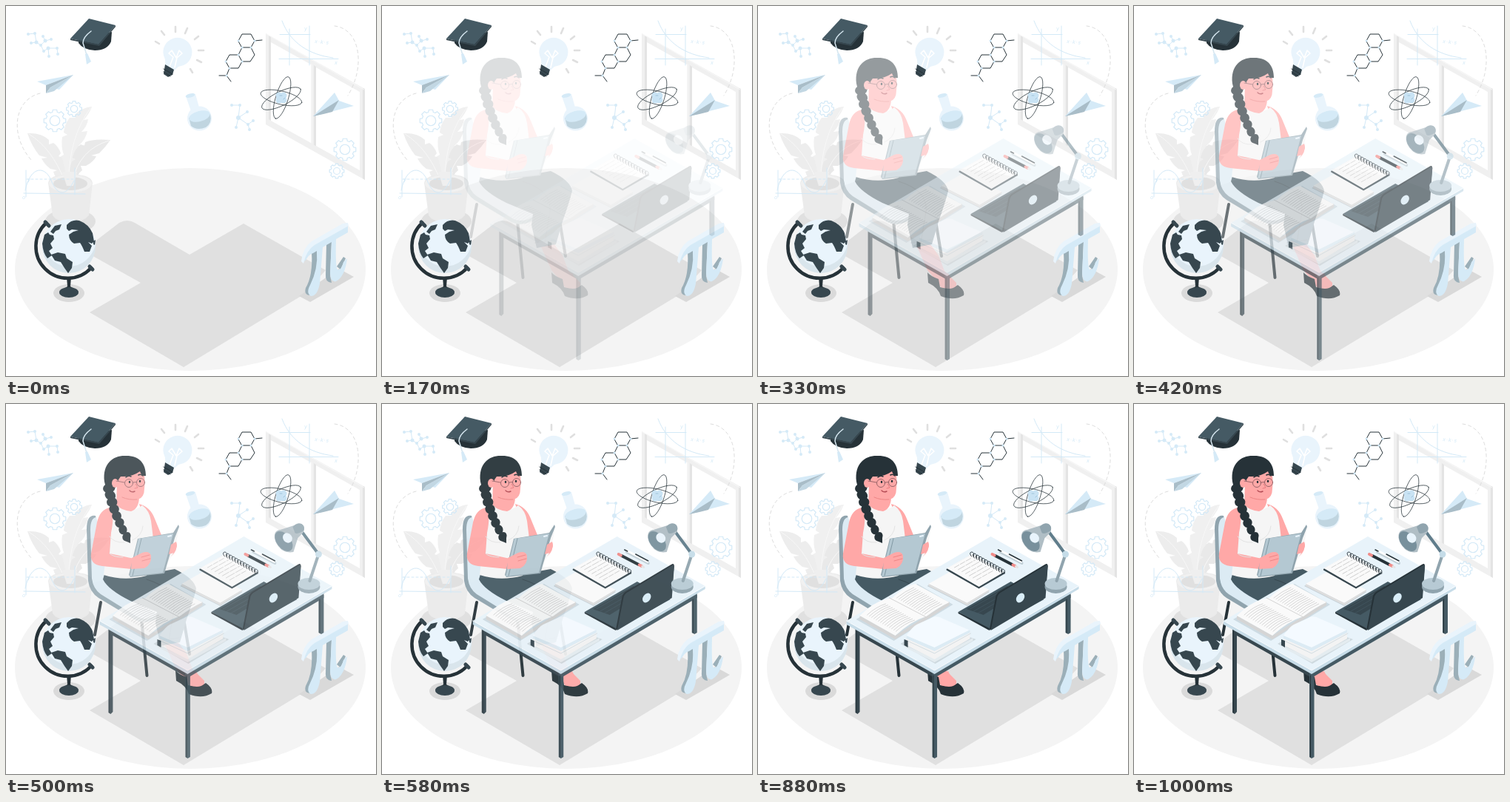
An HTML page for the animation above (1040 ms loop, 500 px wide and 500 px high).

```html
<!DOCTYPE html>
<html lang="en">
<head>
<meta charset="utf-8">
<title>Student at a desk</title>
<style>
html, body { margin: 0; width: 100%; height: 100%; overflow: hidden; background: #fff; }
svg { display: block; width: 100%; height: 100%; }
.line { fill: none; stroke-linecap: round; stroke-linejoin: round; }
.blue { stroke: #d3e9f7; }
.ink { stroke: #263238; }
.sky { fill: #d5eaf7; }
.pale { fill: #e9f4fc; }
.dark { fill: #263238; }
.slate { fill: #37474f; }
.steel { fill: #455a64; }
.mist { fill: #e0e0e0; }
.skin { fill: #ffa8a7; }
text { font: italic 7px Inter, sans-serif; fill: #d3e9f7; }
</style>
</head>
<body>
<svg viewBox="0 0 500 500">
  <!-- floor -->
  <ellipse cx="249" cy="356" rx="237" ry="137" fill="#f4f4f4"/>
  <g class="mist">
    <path d="M113 414 182 374 114 336Q106 330 114 323L153 293Q164 287 174 293L248 336 321 294 432 357 402 390 240 488Z"/>
    <path d="M396 392 411 400 470 366 450 355Z" fill="#d9d9d9"/>
    <ellipse cx="87" cy="291" rx="34" ry="17"/>
    <ellipse cx="85" cy="388" rx="21" ry="12" fill="#dadada"/>
  </g>

  <!-- window -->
  <path fill="#f0f0f0" fill-rule="evenodd" d="M351 37 485 112V235L351 160ZM358 49V155L412 185V79ZM419 83V189L478 222V116Z"/>
  <path fill="#e4e4e4" d="M355 40 358 41V155L355 153ZM416 80 419 82V189L416 188ZM482 111 485 112V235L482 233Z"/>
  <path class="line" stroke="#f8f8f8" d="M352 38 484 113M413 79V185"/>

  <!-- plant -->
  <g fill="#f0f0f0">
    <path d="M116 136Q103 137 93 147L94 151 86 151Q79 160 78 171L83 174 76 177Q74 190 78 201L71 205Q73 222 83 238H92Q93 216 102 206L94 207Q105 198 107 188L98 189Q108 180 110 169L102 170Q110 162 111 153L105 154Q113 145 116 136Z"/>
    <path fill="#ededed" d="M29 172Q48 171 58 181L58 187 64 185Q71 190 74 199L71 203 76 205Q80 222 83 237L74 237Q66 232 64 224L69 222 60 220Q52 214 48 206L56 205 45 202Q34 188 29 172Z"/>
    <path fill="#e9e9e9" d="M141 181Q118 179 107 184L106 189 101 187Q92 194 90 205L94 207 89 210Q84 224 85 238H94Q97 226 103 222L101 216 108 216Q118 211 122 203L115 202 126 199Q135 190 141 181Z"/>
    <path class="line" stroke="#f8f8f8" d="M114 138Q85 178 85 236M31 173Q62 192 79 236M139 182Q99 194 90 236"/>
  </g>
  <path fill="#ebebeb" d="M57 239Q58 228 87 227 116 228 117 239L112 283Q105 292 87 292 69 292 63 283Z"/>
  <ellipse cx="87" cy="240" rx="29" ry="12" fill="#f1f1f1"/>
  <ellipse cx="87" cy="240" rx="23" ry="9" fill="#e0e0e0"/>
  <path fill="#efefef" d="M76 224H96L91 243H82Z"/>

  <!-- globe -->
  <path class="dark" d="M82 366H88L87 379 98 386H72L83 379Z"/>
  <ellipse cx="85" cy="387" rx="13" ry="7" class="slate"/>
  <circle cx="85" cy="325" r="36" fill="#d9e5ec"/>
  <path class="pale" d="M49 325A36 36 0 0 1 121 323Q112 351 85 352 62 352 49 325Z"/>
  <g class="slate">
    <path d="M82 296Q89 288 99 290 112 295 117 307L119 318 116 321 111 319 116 324 113 332 106 332Q103 324 100 320L92 321Q85 317 85 309L91 305 98 303 89 302 85 304 82 301Z"/>
    <path d="M118 318 121 316 120 323 118 322Z"/>
    <path d="M66 297 75 295 72 302 67 304 64 308 60 305Z"/>
    <path d="M52 309 57 306 59 309 64 310 65 315 60 321 63 327 58 331 62 337 56 341Q50 334 49 321Z"/>
    <path d="M61 336 70 333 80 335 82 341 90 346 89 354 84 361 79 354 74 346 66 344Z"/>
  </g>
  <path class="line ink" stroke-width="4.500" stroke-linecap="butt" d="M54.500 293A43 43 0 1 0 115 354"/>
  <path class="line" stroke="#37474f" stroke-width="5" d="M53 292 58 297M113 352 117 356"/>

  <!-- graduation cap -->
  <path class="dark" d="M98 45 143 35 142 48Q137 60 120 60 104 59 98 50Z"/>
  <path class="steel" d="M87 44 112 17 148 26 125 52Z"/>
  <path class="slate" d="M87 44 125 52 148 26V28L126 54 87 46Z"/>
  <path class="line" stroke="#d5e6ef" stroke-width="1.500" d="M115 34Q104 42 104 50L109 66"/>
  <path class="sky" d="M107 65 110 64 115 75 109 79Z"/>

  <!-- bulb -->
  <path class="line" stroke="#dfdfdf" stroke-width="2.600" d="M202 48 207 51M210 34 214 39M229 28V35M245 30 242 37M260 41 255 45M267 60H260M264 76 258 73M252 90 249 85"/>
  <path class="pale" d="M215 79Q216 73 213 67A19.500 19.500 0 1 1 240 80L233 82 226 88Z"/>
  <path class="line" stroke="#fff" stroke-width="1.600" d="M221 82 226 69 220 64 224 60 230 70 234 60 238 64 231 70 228 83"/>
  <path class="slate" d="M215 79 227 86 225 93 219 96 213 92Z"/>
  <path class="line ink" d="M213 85 225 92M213 89 222 95"/>

  <!-- flask -->
  <circle cx="261.500" cy="152" r="16.500" class="pale"/>
  <path class="pale" d="M243 122 256 119 261 137 250 142Z"/>
  <path fill="#c0d5e0" d="M247 151Q262 156 276 146 279 158 270 164 258 169 250 162Z"/>
  <ellipse cx="261.500" cy="149" rx="14.500" ry="7" transform="rotate(-15 261.500 149)" class="sky"/>
  <ellipse cx="249" cy="121" rx="6.500" ry="2.600" transform="rotate(-14 249 121)" class="sky"/>

  <!-- paper planes -->
  <path class="line" stroke="#dcdcdc" stroke-dasharray="4 4" d="M46 118C10 127 5 175 34 208M444 27C479 31 486 82 462 121"/>
  <path class="sky" d="M42 102 91 93 54 107ZM91 93 72 113 60 110ZM415 149 444 117 450 128ZM415 149 450 128 470 135Z"/>
  <path fill="#a9bdc8" d="M54 107 91 93 60 110 54 118ZM415 149 450 127 441 143 429 146Z"/>
  <path fill="#c2d7e3" d="M54 118 60 110 91 93 65 115Z"/>

  <!-- graphs -->
  <g class="line blue">
    <path d="M24 253 107 254M27 222V258M93 219V255M26 249C33 215 54 215 62 238 71 258 82 256 92 236"/>
    <path stroke-dasharray="3 3" d="M28 234H92"/>
    <path d="M369 71.500H449M410 27V80M383 31V80M370 38.500H411M373 20C384 50 410 66 442 70"/>
  </g>
  <text x="22" y="261">o</text><text x="29" y="237">y</text>
  <text x="403" y="33">y</text><text x="444" y="79">x</text>
  <text x="417" y="50" transform="rotate(6 417 50)" letter-spacing="1">x·k·s</text>

  <!-- hexagon chain -->
  <g class="line ink">
    <path d="M314 47 319 38H331L336 47 331 56H319ZM319 56 314 66 319 75H330L336 66 331 56M314 66H302L297 75 302 84H314L319 75M336 47 346 46M302 84 298 94H288M298 94 304 102"/>
    <path stroke="#cfe6f5" stroke-width="3" d="M314 47h.1M319 56h.1M331 56h.1M336 47h.1M314 66h.1M319 75h.1M297 75h.1M302 84h.1M298 94h.1"/>
  </g>

  <!-- atom -->
  <g class="line ink" stroke-width=".7">
    <ellipse cx="372" cy="124" rx="28.500" ry="9" transform="rotate(13 372 124)"/>
    <ellipse cx="372" cy="125" rx="29" ry="9.500" transform="rotate(-26 372 125)"/>
    <ellipse cx="373" cy="124" rx="29.500" ry="8.500" transform="rotate(107 373 124)"/>
  </g>
  <g fill="#c9e3f4">
    <circle cx="369" cy="121" r="4.500"/><circle cx="375" cy="121" r="4.500"/><circle cx="369" cy="127" r="4.500"/><circle cx="375" cy="127" r="4.500"/>
  </g>
  <path class="line" stroke="#9fc3da" d="M370 121H373M375 126 377 124"/>

  <g id="extras"></g>

  <!-- pi -->
  <path fill="#9bafb8" d="M413 333 420 329 421 344Q420 366 412 391 402 391 405 381 415 364 413 333ZM433 321 440 317 438 365 440 374Q431 373 432 363ZM447 352 456 339 459 341 452 356Z"/>
  <path class="sky" d="M401 347 406 342Q410 335 415 334L420 331Q422 355 411 377 405 388 412 392 421 392 424 375L428 326 440 319 438 360Q438 374 446 372 458 366 461 341L456 346Q453 358 448 356 445 354 446 315L462 306V293L415 321Q404 329 401 347Z"/>
  <path class="pale" d="M399 345Q401 327 413 318L455 294 462 293 463 297 417 323Q406 330 402 348Z"/>

  <g id="person">
    <!-- chair -->
    <path class="line ink" stroke-width="4" d="M128 268 120 312M183 290 190.500 367M237 272 248 338"/>
    <path fill="#90a4ae" d="M121 151Q109 149 109 169L111 239Q113 254 125 262L175 292Q186 298 200 292L255 259 250 243 180 240 130 190Z"/>
    <path fill="#dcebf4" d="M122 153Q114 154 114 170L116 236Q118 250 128 257L178 288Q187 292 198 288L255 254 190 225 135 200Z"/>
    <!-- lower body -->
    <path class="skin" d="M213 321 230 318 244 337 252 358 268 374 268 383 250 384 240 370 229 357Z"/>
    <path class="dark" d="M229 360Q233 365 244 369L246 380Q262 383 270 377 280 384 278 391 265 399 247 392 244 381 230 374Z"/>
    <path class="skin" d="M246 365 257 361Q261 371 268 378 262 385 247 380Z"/>
    <path class="steel" d="M133 230Q160 222 190 230L228 223Q255 236 257 250 252 269 244 291L235 322 209 327 202 296 204 281 168 266Q138 251 131 237Z"/>
    <path class="line" stroke="#37474f" d="M190 237Q230 249 227 278L220 320M207 320 234 316"/>
    <!-- torso -->
    <path class="skin" d="M180 135Q195 139 201 155L210 177Q231 178 231 192 229 204 219 208L204 190 190 168Z"/>
    <path fill="#f5f5f5" d="M146 137Q169 149 184 137 194 144 196 158L199 182 190 232Q160 240 132 231L136 195 133 149Z"/>
    <path class="skin" d="M150 106 181 112 180 127Q179 142 169 145 156 144 149 136Z"/>
    <path class="skin" d="M141 140Q127 142 123 160L115 202Q113 217 130 219L179 224Q194 220 196 206 194 199 184 203L173 209 140 202 142 174Q147 151 141 140Z"/>
    <path class="line" stroke="#e3e3e3" d="M140 179Q146 188 160 187M185 165Q184 178 171 184M140 202Q145 207 158 207"/>
    <!-- head -->
    <path class="skin" d="M148 88 184 87Q189 99 187 114 187 127 178 129 164 130 154 118Z"/>
    <path class="dark" d="M133 105C130 80 145 70 160 70 179 69 189 79 189 97Q183 98 181 91 170 99 155 98 152 101 151 106L146 117 135 113Z"/>
    <g id="braid" class="dark"></g>
    <ellipse cx="147.500" cy="107" rx="4.500" ry="6" class="skin"/>
    <g class="line ink" stroke-width=".9">
      <circle cx="166" cy="107" r="5.500" stroke="#8d5d63"/><circle cx="182" cy="106" r="5.500" stroke="#8d5d63"/>
      <path stroke="#8d5d63" d="M171.500 106 176.500 105.500M160 106 149 104"/>
      <path stroke-width="1.600" d="M162 99Q165 96 169 98M179 96Q182 94 185 97"/>
      <path stroke-width="2.400" d="M167 105v.8M181 104v.8"/>
      <path stroke="#e5777b" d="M175 108 178 113 174 114"/>
      <path stroke="#b44c55" stroke-width="1.400" d="M167 117Q170 120 174 118"/>
    </g>
    <path class="line" stroke="#ed8585" d="M157 126Q166 130 177 129"/>
    <!-- held book -->
    <path fill="#f7f7f7" d="M211 228 223 178 233 164V172L228 198Z"/>
    <path fill="#8fa3ad" d="M178 182 226 174 233 163 234 166 228 181 214 229 168 234 166 231Z"/>
    <path fill="#b4c8d2" d="M179 182 226 175 212 228 167 233Z"/>
    <path class="line" stroke="#8299a4" d="M183 182 171 232"/>
    <path class="line" stroke="#e9f4fc" stroke-width="2" d="M219 179 223 178"/>
    <path class="skin" d="M170 208 184 201Q194 198 196 205 197 217 187 222L169 223ZM223 190 230 186Q232 194 227 201L220 203Z"/>
    <path class="line" stroke="#ed8585" d="M183 207 194 204M184 212 195 209"/>
  </g>

  <g id="desk">
    <path class="steel" d="M417 258H424V309L420.500 311 417 309Z"/>
    <path class="slate" d="M133 301 240 361V370L139 313V416L136 419 133 417Z"/>
    <path class="steel" d="M240 361 424 255V262L243.500 368V477L240 479 237 477V361Z"/>
    <path class="line ink" d="M134.500 305V417M238.500 367V477M418.500 264V309"/>
    <path fill="#c7dce8" d="M121 293 240 360 435 246V250L240 365 121 298Z"/>
    <path fill="#e8f3fa" d="M121 293 316 179 435 246 240 360Z"/>
    <path class="line" stroke="#f8fcff" d="M121 293 240 360 435 246"/>

    <!-- open book -->
    <path fill="#cddbe3" d="M134 291 217 243 265 271 185 320Z"/>
    <path fill="#d5d5d5" d="M139 286 187 313 260 267V272L187 318 139 291Z"/>
    <path fill="#fafafa" d="M139 286Q157 268 174 264L183 262Q200 246 214 243L260 268Q245 275 229 287 209 293 187 313Z"/>
    <path class="line" stroke="#d4d4d4" d="M179 262 229 288"/>
    <g id="pages" class="line" stroke="#cdcdcd" stroke-width=".8"></g>

    <!-- closed books -->
    <path fill="#ced9df" d="M194 324 240 298 296 318 241 351Z"/>
    <path fill="#e4ecf0" d="M200 326 240 344 292 316V320L240 349 200 329Z"/>
    <path fill="#f3f3f3" d="M202 314 240 330 288 306V317L240 345 202 326Z"/>
    <path class="line" stroke="#d3dde2" d="M203 320 240 337 289 310"/>
    <path class="slate" d="M199 318 204 320V329L199 326Z"/>
    <path fill="#f4faff" d="M202 313Q210 301 216 298L238 288Q245 286 251 290L288 306 240 331 202 316Z"/>
    <path fill="#dcebf4" d="M202 313 240 329 288 305V309L240 334 202 317Z"/>

    <!-- papers and notebook -->
    <path fill="#c5d0d6" d="M230 246 262 228 314 254 284 273Z"/>
    <path fill="#fafafa" d="M232 243 262 226 314 251 284 269Z"/>
    <path fill="#dedede" d="M232 243 284 269 314 251V253L284 272 232 246Z"/>
    <path class="slate" d="M256 223 291 203 334.500 227V229.500L300 249.500 256 224.500Z"/>
    <path fill="#fafafa" d="M256.500 222 291 202.500 334 227 300 247Z"/>
    <g id="notes" class="line" stroke="#c4c4c4" stroke-width=".8"></g>
    <g id="rings" class="line ink" stroke-width=".9"></g>

    <!-- pens -->
    <path class="line" stroke="#c2d0d7" stroke-width="4" d="M329 200 358 215"/>
    <path class="line" stroke="#fff" stroke-width="3" d="M329 198 357 213"/>
    <path class="line ink" stroke-width="1.500" d="M326 197 330 199M341 203 358 212"/>
    <path class="line ink" stroke-width="4" d="M322 205 345 217"/>
    <path class="line" stroke="#f18b88" stroke-width="4" d="M318 203 321 204.500M346 217.500 349 219"/>
    <path class="line" stroke="#e4e4e4" stroke-width="3" d="M350 219.500 352 220.500"/>

    <!-- laptop -->
    <path class="steel" d="M272 281 343 240 388 264 314 305Z"/>
    <path class="dark" d="M272 281 314 303V306L272 283Z"/>
    <path class="slate" d="M283 277 338 246 355 255 306 285Z"/>
    <path class="line" stroke="#455a64" stroke-width=".7" d="M288 277 341 247M293 280 346 250M298 283 350 253"/>
    <path class="dark" d="M314 306 323 259Q324 256 327 254L389 217Q393 214 393 219L389 262Z"/>
    <path class="slate" d="M316 306 325 260Q326 257 329 255L389 219Q394 215 393 221L390 262Z"/>
    <ellipse cx="356" cy="262" rx="5" ry="7" transform="rotate(35 356 262)" fill="#d9edf8"/>

    <!-- lamp -->
    <ellipse cx="404" cy="247" rx="15" ry="9" fill="#90a4ae"/>
    <ellipse cx="404" cy="243" rx="15" ry="8" fill="#b7cad4"/>
    <path class="line" stroke="#607d8b" stroke-width="4" d="M394 172 417 203"/>
    <path class="line" stroke="#90a4ae" stroke-width="4" d="M417 203 405 239"/>
    <circle cx="417" cy="203" r="4.500" fill="#c5dce8"/>
    <path fill="#b0bec5" d="M362 171 384 164Q388 160 394 162 400 167 396 174L389 181 383 200Q372 202 365 195Z"/>
    <path fill="#90a4ae" d="M382 166Q388 160 394 162 399 165 397 171 388 177 385 174Z"/>
    <ellipse cx="371" cy="185" rx="11" ry="17" transform="rotate(-38 371 185)" fill="#b0bec5"/>
    <ellipse cx="370" cy="185.500" rx="9.500" ry="15.500" transform="rotate(-38 370 185.500)" fill="#78909c"/>
    <ellipse cx="375" cy="181" rx="6" ry="7" transform="rotate(-38 375 181)" fill="#e9f4fc"/>
  </g>
</svg>
<script>
const $ = id => document.getElementById(id);
const path = (d, attrs = '') => `<path d="${d}" ${attrs}/>`;
const range = (n, fn) => Array.from({ length: n }, (_, i) => fn(i)).join('');

// Eight-toothed cog outline with a hub
function gear(x, y, r) {
  const at = (radius, a) => `${x + radius * Math.cos(a)} ${y + radius * Math.sin(a)}`;
  const teeth = range(8, i => {
    const a = i * Math.PI / 4;
    return [[.8, -.27], [1, -.18], [1, .18], [.8, .27]]
      .map(([k, da]) => 'L' + at(r * k, a + da)).join('');
  });
  return path('M' + teeth.slice(1) + 'Z', 'class="line blue" stroke-width="1.200"') +
    `<circle cx="${x}" cy="${y}" r="${r * .45}" class="line blue" stroke-width="1.200"/>`;
}

function molecule(bonds, atoms) {
  return path(bonds, 'class="line blue"') +
    atoms.map(([x, y, r = 2]) => `<circle cx="${x}" cy="${y}" r="${r}" class="sky"/>`).join('');
}

$('extras').innerHTML =
  gear(66, 155, 15) + gear(92, 139, 10.5) + gear(458, 194, 15) + gear(447, 223, 10) +
  molecule('M30 38 39 37 41 49 34 50M41 49 47 53 53 47 50 41M53 47 61 45M47 53 51 61 57 57 69 57 70 65M57 57 58 68',
    [[30, 38], [39, 37], [41, 49, 2.5], [34, 50], [47, 53], [53, 47, 2.5], [50, 41], [61, 45], [51, 61], [57, 57, 2.5], [69, 57], [70, 65], [58, 68]]) +
  molecule('M305 134H316L314 151 326 143M314 151 311 164M314 151 327 160 334 155M327 160 329 167',
    [[305, 134], [316, 134], [314, 151, 3], [326, 143], [311, 164], [327, 160], [334, 155], [329, 167]]);

// Braid hangs straight at first, then swings right
$('braid').innerHTML = range(8, i => {
  const x = 139 + i * 1.6 + i * i * .26, y = 114 + i * 9.3, r = 8 - i * .4;
  return `<ellipse cx="${x}" cy="${y}" rx="${r}" ry="6.500" transform="rotate(${i % 2 ? 32 : -5} ${x} ${y})"/>`;
}) + path('M159 177 168 178 168 188 161 185Z');

$('pages').innerHTML = range(14, i =>
  path(`M${149 + i * 3} ${285 + i * 1.7}q12 -11 25 -15`) +
  path(`M${189 + i * 2.9} ${262 + i * 1.7}q11 -9 23 -14`));
$('notes').innerHTML = range(7, i =>
  path(`M${267 + i * 5} ${221 + i * 2.8}l23 -13`, `stroke-dasharray="${7 + i % 3 * 3} 2"`));
$('rings').innerHTML = range(12, i =>
  path(`M${290 + i * 3.8} ${206 + i * 2.1}q-4 -5 0 -6q4 0 3 6`));

// Cubic Bézier easing (.36, -.01, .5, 1.38), solved by bisection
function ease(x) {
  if (x <= 0 || x >= 1) return x <= 0 ? 0 : 1;
  const curve = (s, a, b) => 3 * (1 - s) ** 2 * s * a + 3 * (1 - s) * s * s * b + s ** 3;
  let lo = 0, hi = 1;
  for (let i = 0; i < 24; i++) {
    const mid = (lo + hi) / 2;
    if (curve(mid, .36, .5) < x) lo = mid; else hi = mid;
  }
  return curve(lo, -.01, 1.38);
}

const LOOP = 1040, FPS = 24;
const start = performance.now();

function draw() {
  const ms = (performance.now() - start) % LOOP;
  const step = Math.floor((ms + 4) * FPS / 1000);
  const p = step < 2 ? 0 : ease((step + 1) / FPS);
  const alpha = Math.min(1, p);
  $('person').setAttribute('opacity', alpha);
  $('desk').setAttribute('opacity', alpha);
  $('desk').setAttribute('transform', `translate(${30 * (1 - p)})`);
  requestAnimationFrame(draw);
}
draw();
</script>
</body>
</html>
```
